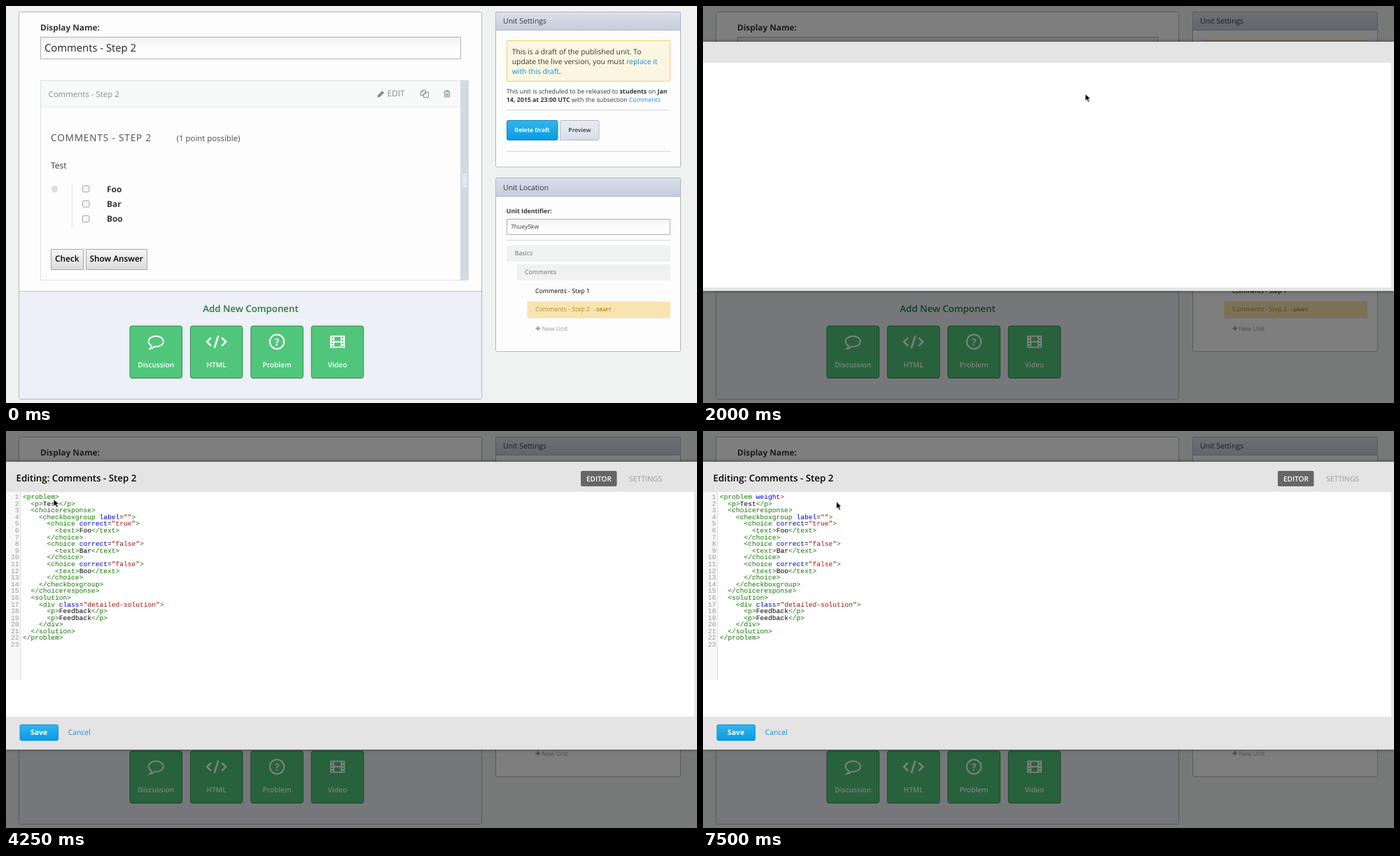
An HTML page for the animation above (8 s loop, 987 px wide and 567 px high).

```html
<!DOCTYPE html>
<html lang="en">
<head>
<meta charset="utf-8">
<title>Unit editor</title>
<style>
html, body { margin: 0; width: 100%; height: 100%; overflow: hidden; background: #f0f2f2; }
#stage { position: relative; width: 987px; height: 567px; overflow: hidden; }
svg { position: absolute; left: 0; top: 0; display: block; }
svg text { font-family: "Open Sans", sans-serif; fill: #363636; text-rendering: geometricPrecision; white-space: pre; }
svg .b { font-weight: 700; }
svg .s { font-weight: 600; }
svg .w { fill: #fff; }
svg .k { fill: #000; }
svg .g { fill: #8b8d8f; }
svg .link { fill: #0e8fd6; }
svg .mid { text-anchor: middle; }
.side { font-size: 8.8px; }
.note { font-size: 10.4px; }
.line { stroke: #d3d5d8; fill: none; }
.panel { fill: #fdfdfd; stroke: #b3b6ba; }
.icon { fill: none; stroke: #fff; }
.grey { fill: none; stroke: #8b8d8f; }

.hover, .dim, .blank, .editor, .caret, .pointer { animation: 8s step-end infinite; }
.hover { animation-name: hover; }
.dim { animation-name: dim; position: absolute; inset: 0; background: rgba(0,0,0,.5); }
.blank { animation-name: blank; }
.editor { animation-name: editor; position: absolute; inset: 0; }
@keyframes hover { 0% { opacity: 0 } 18.75%, 100% { opacity: 1 } }
@keyframes dim { 0% { opacity: 0 } 25%, 100% { opacity: 1 } }
@keyframes blank { 0% { opacity: 0 } 25% { opacity: 1 } 34.375%, 100% { opacity: 0 } }
@keyframes editor { 0% { opacity: 0 } 34.375%, 100% { opacity: 1 } }

.modal { position: absolute; left: 0; width: 987px; background: #e4e4e4; box-shadow: 0 0 5px rgba(0,0,0,.5); }
.modal i { position: absolute; left: 0; width: 983px; background: #fff; }
.blank { top: 51px; height: 356px; }
.blank i { top: 30px; height: 321px; }
.full { top: 44px; height: 411px; }
.full i { top: 43px; height: 321px; }
.gutter { position: absolute; left: 0; top: 87px; width: 21px; height: 269px; background: #f7f7f7; border-right: 1px solid #ddd; box-sizing: border-box; }
pre { position: absolute; top: 90px; margin: 0; font: 9.6px/9.59px "Liberation Mono", "Courier New", monospace; color: #000; text-rendering: geometricPrecision; }
#code { left: 24px; }
#nums { left: 0; width: 18.5px; text-align: right; color: #999; }
.tag { color: #170; }
.att { color: #00c; }
.str { color: #a11; }
.typed { display: inline-block; height: 9.59px; vertical-align: top; overflow: hidden; color: #00c; animation: type 8s step-end infinite; }
.end { color: #170; animation: end 8s step-end infinite; }
@keyframes type {
  0% { width: 0 } 68.75% { width: 1ch } 78.125% { width: 3ch } 81.25% { width: 4ch }
  84.375% { width: 6ch } 87.5%, 100% { width: 7ch }
}
@keyframes end { 0% { color: #170 } 78.125%, 100% { color: #d11 } }
.caret { position: absolute; left: 24px; top: 90px; width: 1px; height: 10px; background: #000;
  font: 9.6px "Liberation Mono", monospace; animation-name: caret; }
@keyframes caret {
  0% { transform: none; opacity: 1 }
  40.625% { opacity: 0 }
  46.875% { transform: none; opacity: 1 }
  53.125% { transform: none; opacity: 0 }
  56.25% { transform: translateX(8ch); opacity: 1 }
  68.75% { transform: translateX(9ch); opacity: 1 }
  75% { transform: translateX(9ch); opacity: 0 }
  78.125% { transform: translateX(11ch); opacity: 1 }
  81.25% { transform: translateX(12ch) }
  84.375% { transform: translateX(14ch) }
  87.5% { transform: translateX(15ch); opacity: 1 }
  93.75%, 100% { transform: translateX(15ch); opacity: 0 }
}
.pointer { animation-name: point; overflow: visible; }
@keyframes point {
  0% { transform: translate(463px,47px); opacity: 0 }
  3.125% { transform: translate(463px,47px); opacity: 1 }
  6.25% { transform: translate(492px,76px) }
  9.375% { transform: translate(524px,106px) }
  12.5% { transform: translate(551px,127px) }
  18.75% { transform: translate(545.5px,125px) }
  28.125% { transform: translate(470px,124px) }
  31.25% { transform: translate(340px,118px) }
  34.375% { transform: translate(249.5px,113.5px) }
  40.625% { transform: translate(215px,110px) }
  43.75% { transform: translate(160px,106px) }
  46.875% { transform: translate(105px,102px) }
  50% { transform: translate(80px,98px) }
  53.125% { transform: translate(67.5px,97px) }
  56.25% { transform: translate(71px,95px) }
  59.375% { transform: translate(140px,99px) }
  62.5%, 100% { transform: translate(190px,100.5px); opacity: 1 }
}
</style>
</head>
<body>
<div id="stage">
<svg width="987" height="567" viewBox="0 0 987 567">
  <defs>
    <linearGradient id="head" x2="0" y2="1"><stop stop-color="#dbe1ea"/><stop offset="1" stop-color="#c4cddc"/></linearGradient>
    <linearGradient id="blue" x2="0" y2="1"><stop stop-color="#35b4ee"/><stop offset="1" stop-color="#069be3"/></linearGradient>
    <linearGradient id="pale" x2="0" y2="1"><stop stop-color="#e9ecf3"/><stop offset="1" stop-color="#d9dde7"/></linearGradient>
    <linearGradient id="field" x2="0" y2="1"><stop stop-color="#f1f1f1"/><stop offset=".5" stop-color="#fdfdfd"/></linearGradient>
    <linearGradient id="push" x2="0" y2="1"><stop stop-color="#f5f5f5"/><stop offset="1" stop-color="#dcdcdc"/></linearGradient>
    <path id="pencil" d="M530.5 130.5 531.2 127.2 537.2 121 540.2 123.9 534 129.9Z"/>
  </defs>
  <rect width="987" height="567" fill="#f0f2f2"/>

  <rect class="panel" x="18.5" y="8.5" width="661" height="553" rx="2"/>
  <path d="M19 408H679V561H19Z" fill="#edf0f6"/>
  <path d="M19 407.5H679" stroke="#c3c7cd"/>
  <text class="b" x="49" y="34.8" font-size="11.8">Display Name:</text>
  <rect x="49.5" y="44.5" width="600" height="31" fill="url(#field)" stroke="#b2b2b2"/>
  <text x="55" y="64.8" font-size="14.8" style="fill:#222">Comments - Step 2</text>

  <rect x="49.5" y="106.5" width="611" height="285" fill="#fdfdfd" stroke="#dde1e5"/>
  <path d="M50 107H649V144H50Z" fill="#f8f9f9"/>
  <path d="M50 144.5H649" stroke="#e6e8ea"/>
  <path d="M649 106H661V392H649Z" fill="#d1dae5"/>
  <text class="g" x="60.5" y="130" font-size="11.45">Comments - Step 2</text>
  <use href="#pencil" fill="#8b8d8f"/>
  <text class="g" x="544.5" y="129.3" font-size="11.8">EDIT</text>
  <g class="hover">
    <rect x="49.5" y="106.5" width="611" height="285" fill="none" stroke="#8db2e0"/>
    <path d="M649 106H661V392H649Z" fill="#009fe6"/>
    <rect x="523" y="114" width="55" height="22.5" rx="2" fill="#0a9fe8"/>
    <use href="#pencil" fill="#fff"/>
    <text class="w" x="544.5" y="129.3" font-size="11.8">EDIT</text>
  </g>
  <path d="M652.5 240V258.5M655 240V258.5M657.5 240V258.5" stroke="#fff" stroke-width="1.5" stroke-dasharray="1.8 1.5"/>
  <path class="grey" d="M596.5 127.5H592.5V122.5L595 120H599V123M595.5 120V122.5H592.5M596.5 130.5V125.5L599 123H603.5V130.5ZM599.5 123V125.5H596.5"/>
  <path class="grey" d="M625.5 122.5H634.5M628.5 122V120.5H631.5V122M626.5 123V130H633.5V123M628.5 124.5V128.5M630 124.5V128.5M631.5 124.5V128.5"/>

  <text x="64" y="193.3" font-size="13.6" letter-spacing=".85" style="fill:#4c4c4c">COMMENTS - STEP 2</text>
  <text x="243.7" y="193" font-size="11.4" style="fill:#4c4c4c">(1 point possible)</text>
  <text x="64" y="231.5" font-size="12">Test</text>
  <circle cx="69.5" cy="261.5" r="4.8" fill="#dedede"/>
  <path d="M94.5 253V318" stroke="#e1e1e1"/>
  <g id="choices"></g>
  <rect x="64.5" y="347.5" width="46" height="29" fill="url(#push)" stroke="#a6a6a6"/>
  <rect x="114.5" y="347.5" width="87" height="29" fill="url(#push)" stroke="#a6a6a6"/>
  <text class="s k mid" x="87.3" y="365.1" font-size="11.8">Check</text>
  <text class="s k mid" x="157.7" y="365.1" font-size="11.8">Show Answer</text>

  <text class="s mid" x="349.5" y="436.8" font-size="13.3" style="fill:#2b7a41">Add New Component</text>
  <g id="kinds"></g>
  <path class="icon" stroke-width="2" d="M208 485.2C205 483.8 203.6 481.6 203.6 479.2C203.6 474.9 208.2 471.6 214.2 471.6S224.8 474.9 224.8 479.2S220.2 486.6 214.2 486.6L212 486.5C210.2 488.2 208.2 489.3 205.6 489.6C207.2 488.2 207.9 486.8 208 485.2Z"/>
  <path class="icon" stroke-width="2.6" d="M292.8 473.8 287 479.6 292.8 485.4M308.2 473.8 314 479.6 308.2 485.4M303.3 470.8 297.7 488.4"/>
  <circle class="icon" stroke-width="2" cx="387" cy="479.5" r="10.2"/>
  <text class="b w mid" x="387" y="484.6" font-size="14">?</text>
  <g fill="#fff">
    <path fill-rule="evenodd" d="M463 470.8H484V488.2H463ZM469 472.6V478.6H478V472.6ZM469 480.4V486.4H478V480.4Z"/>
    <path class="icon" stroke-width="2" style="stroke:#50c67b" stroke-dasharray="2 2.2" d="M466 472.5V487.5M481 472.5V487.5"/>
  </g>

  <rect class="panel" x="699.5" y="8.5" width="264" height="221.5" rx="2"/>
  <rect x="699.5" y="8.5" width="264" height="26" rx="2" fill="url(#head)" stroke="#b0b8c4"/>
  <text x="710" y="25" font-size="10.5">Unit Settings</text>
  <rect x="715.5" y="49.5" width="233" height="58" rx="1.5" fill="#fbf6e1" stroke="#ecd077"/>
  <g class="note">
    <text x="722.7" y="68.6">This is a draft of the published unit. To</text>
    <text x="722.7" y="82.7">update the live version, you must <tspan class="link">replace it</tspan></text>
    <text x="722.7" y="96.7"><tspan class="link">with this draft</tspan>.</text>
  </g>
  <g class="side">
    <text x="714.8" y="124.6">This unit is scheduled to be released to <tspan class="b">students</tspan> on <tspan class="b">Jan</tspan></text>
    <text x="714.8" y="137"><tspan class="b">14, 2015 at 23:00 UTC</tspan> with the subsection <tspan class="link">Comments</tspan></text>
  </g>
  <path class="line" d="M715 148.5H949M715 207.5H949"/>
  <rect x="715.5" y="163.5" width="72.5" height="28" rx="2" fill="url(#blue)" stroke="#1586be"/>
  <rect x="791.5" y="163.5" width="55.5" height="28" rx="2" fill="url(#pale)" stroke="#b3b8c2"/>
  <text class="b w mid" x="751.5" y="180" font-size="8.25">Delete Draft</text>
  <text class="b mid" x="819.4" y="180" font-size="8.2" style="fill:#4d535e">Preview</text>

  <rect class="panel" x="699.5" y="245.5" width="264" height="248" rx="2"/>
  <rect x="699.5" y="245.5" width="264" height="26.5" rx="2" fill="url(#head)" stroke="#b0b8c4"/>
  <text x="710" y="262.6" font-size="10.5">Unit Location</text>
  <text class="b side" x="714.8" y="296.3">Unit Identifier:</text>
  <rect x="715.5" y="304.5" width="233" height="22" fill="url(#field)" stroke="#b2b2b2"/>
  <text x="721" y="318.3" font-size="8.5">7huey5kw</text>
  <path class="line" d="M715 334.5H949"/>
  <path d="M715 342H949V365H715ZM730 369H949V392H730Z" fill="#f0f1f1"/>
  <path d="M744.5 422H949V446H744.5Z" fill="#f8e4b0"/>
  <g class="side">
    <text x="726.7" y="356.3" style="fill:#6b6b6b">Basics</text>
    <text x="741" y="383" style="fill:#6b6b6b">Comments</text>
    <text class="k" x="756" y="409.6">Comments - Step 1</text>
    <text x="756" y="436.3" style="fill:#b98a22">Comments - Step 2</text>
    <text class="b" x="839.5" y="436" font-size="6.5" style="fill:#b98a22">- DRAFT</text>
    <text x="765.5" y="463.5" font-size="8.7" style="fill:#999">New Unit</text>
  </g>
  <path d="M756.5 460.5H763M759.7 457.2V463.8" stroke="#999" stroke-width="1.8"/>
</svg>

<div class="dim"></div>
<div class="modal blank"><i></i></div>
<div class="editor">
  <div class="modal full"><i></i></div>
  <div class="gutter"></div>
  <svg width="987" height="567" viewBox="0 0 987 567">
    <text class="s k" x="14.5" y="71.5" font-size="13.3">Editing: Comments - Step 2</text>
    <rect x="821" y="57" width="51.5" height="22" rx="2" fill="#666"/>
    <text class="s w mid" x="847" y="71.6" font-size="10.1">EDITOR</text>
    <text x="890" y="71.6" font-size="10.4" style="fill:#999">SETTINGS</text>
    <rect x="20" y="419.5" width="54.5" height="22.5" rx="2" fill="url(#blue)" stroke="#1a94cf"/>
    <text class="b w mid" x="47" y="434.3" font-size="10.4">Save</text>
    <text class="link" x="88.7" y="434.3" font-size="10.35">Cancel</text>
  </svg>
  <pre id="nums"></pre>
  <pre id="code"></pre>
  <div class="caret"></div>
</div>
<svg class="pointer" width="10" height="15">
  <path d="M.5 .3V10.7L2.9 8.5 4.6 12.4 6.5 11.6 4.9 7.8H8.1Z" stroke="#fff" stroke-width=".8"/>
</svg>
</div>
<script>
const el = id => document.getElementById(id);

el('choices').innerHTML = ['Foo', 'Bar', 'Boo'].map((name, i) => {
  const y = 256.7 + i * 21.4;
  return `<rect x="109.5" y="${y}" width="9.5" height="9" rx="1.5" fill="#f6f6f6" stroke="#a3a3a3"/>
    <text class="b" x="144" y="${y + 8.8}" font-size="11.9">${name}</text>`;
}).join('');

el('kinds').innerHTML = ['Discussion', 'HTML', 'Problem', 'Video'].map((name, i) => {
  const x = 177 + i * 86.4;
  return `<rect x="${x}" y="457" width="74.5" height="74.5" rx="3" fill="#50c67b" stroke="#35874f"/>
    <text class="s w mid" x="${x + 37.2}" y="515.7" font-size="10.1">${name}</text>`;
}).join('');

const choice = (ok, label) => `      <choice correct="${ok}">
        <text>${label}</text>
      </choice>
`;
const body = `
  <p>Test</p>
  <choiceresponse>
    <checkboxgroup label="">
${choice(true, 'Foo')}${choice(false, 'Bar')}${choice(false, 'Boo')}    </checkboxgroup>
  </choiceresponse>
  <solution>
    <div class="detailed-solution">
      <p>Feedback</p>
      <p>Feedback</p>
    </div>
  </solution>
</problem>`;

const paint = text => text.replace(/(<\/?\w+|>)|(\w+(?==))|("[^"]*")/g, (part, tag, att) =>
  `<span class="${tag ? 'tag' : att ? 'att' : 'str'}">${part.replace('<', '&lt;').replace('>', '&gt;')}</span>`);

el('code').innerHTML = paint('<problem') +
  '<span class="typed"> weight</span><span class="end">&gt;</span>' + paint(body);
el('nums').textContent = Array.from({ length: 23 }, (_, i) => i + 1).join('\n');
</script>
</body>
</html>
```
